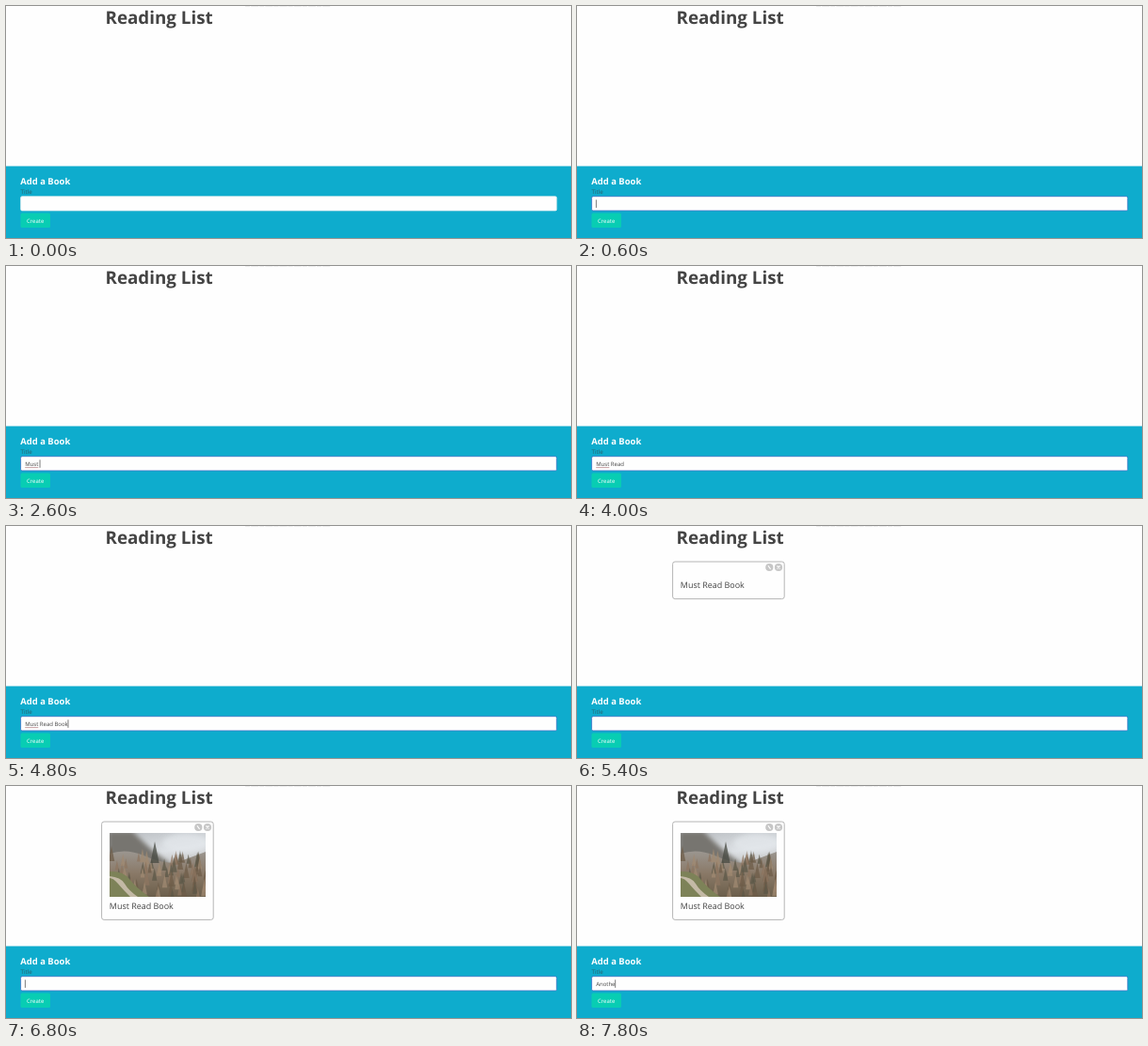
An HTML page that plays this animation: 600 by 247 pixels, repeating every 8 s.

```html
<!DOCTYPE html>
<html lang="en">
<head>
<meta charset="utf-8">
<title>Reading List</title>
<style>
html, body { margin: 0; width: 100%; height: 100%; overflow: hidden; background: #fefefe; }
svg { display: block; }
text {
  font: 6px "Open Sans", "Noto Sans", sans-serif;
  fill: #444;
  white-space: pre;
  text-rendering: geometricPrecision;
}
.bold { font-weight: 700; }
</style>
</head>
<body>
<svg width="600" height="247" viewBox="0 0 600 247">
  <defs>
    <linearGradient id="sky" x1="0" y1="0" x2=".25" y2="1">
      <stop offset="0" stop-color="#b9bdc1"/>
      <stop offset=".4" stop-color="#dde1e5"/>
      <stop offset="1" stop-color="#a5a19c"/>
    </linearGradient>
    <linearGradient id="hill" x1="0" y1="0" x2="0" y2="1">
      <stop offset="0" stop-color="#9b9690"/>
      <stop offset=".5" stop-color="#897866"/>
      <stop offset="1" stop-color="#6b5f4c"/>
    </linearGradient>
    <filter id="soft"><feGaussianBlur stdDeviation="2.5"/></filter>
    <clipPath id="frame"><path d="M110 50H212V118H110Z"/></clipPath>
  </defs>

  <path d="M254 0H345" stroke="#d4d4d4" stroke-width=".8" stroke-dasharray="5 1.2 8 1"/>
  <text class="bold" x="105.5" y="19.3" style="font-size:18.8px">Reading List</text>

  <g id="card">
    <rect id="box" x="101.6" y="38" width="118.6" rx="2.5" fill="#fefefe" stroke="#b5b5b5"/>
    <g fill="#c6c6c6"><circle cx="204.3" cy="44" r="4.1"/><circle cx="214" cy="44" r="4.1"/></g>
    <path d="M202.9 42.2L205.6 45.9M212.5 42.5L215.5 45.5M215.5 42.5L212.5 45.5" stroke="#fff" stroke-width="1.1"/>
    <g id="photo" clip-path="url(#frame)">
      <path d="M110 50H212V118H110Z" fill="url(#sky)"/>
      <path d="M108 48H134Q146 60 160 72L176 84L150 100H108Z" fill="#77756f" filter="url(#soft)"/>
      <path d="M110 72Q128 66 146 74T180 82L212 70V118H110Z" fill="url(#hill)"/>
      <g id="trees"></g>
      <path d="M110 91Q124 90 131 99T152 118H110Z" fill="#7d8258"/>
      <path d="M110 96Q122 97 126 104T140 118H132Q124 110 119 104T110 98Z" fill="#c3b9a5"/>
      <ellipse cx="190" cy="61" rx="24" ry="10" fill="#e3e7eb" opacity=".75" filter="url(#soft)"/>
    </g>
    <text id="name" x="109.8" style="font-size:8.96px">Must Read Book</text>
  </g>

  <path d="M0 170.6H600V247H0Z" fill="#0eaccd"/>
  <text class="bold" x="15.3" y="189.5" style="font-size:9.45px;fill:#fff">Add a Book</text>
  <text x="15.5" y="200.3" style="font-size:6.2px;fill:#28606c">Title</text>
  <rect id="input" x="15.6" y="202.7" width="569.2" height="15.2" rx="1.5" fill="#fefefe" stroke-width=".8"/>
  <text id="typed" x="20.2" y="213.2"></text>
  <path id="spell" d="M20.2 214.6H34.3" stroke="#b07a80" stroke-width=".7"/>
  <path id="caret" d="M0 206.3V214.8" stroke="#444" stroke-width=".7"/>
  <rect x="15.5" y="220.5" width="31.5" height="15.6" rx="1.5" fill="#08cdb3"/>
  <text x="22" y="230.8" style="fill:#fff">Create</text>
</svg>
<script>
const $ = id => document.getElementById(id);
const LOOP = 8000;

// [start ms, typed text, caret visible]
const steps = [
  [0, '', 0], [400, '', 1], [1200, '', 0], [1600, '', 1],
  [2000, 'M', 1], [2200, 'Mu', 1], [2400, 'Must', 1], [2600, 'Must ', 1],
  [2800, 'Must R', 1], [3000, 'Must Re', 1], [3400, 'Must Read ', 1],
  [4000, 'Must Read ', 0], [4200, 'Must Read B', 1], [4400, 'Must Read Bo', 1],
  [4600, 'Must Read Boo', 1], [4800, 'Must Read Book', 1],
  [5400, '', 0], [5800, '', 1], [6400, '', 0], [6600, '', 1],
  [7000, 'A', 1], [7200, 'An', 1], [7400, 'Ano', 1], [7600, 'Anot', 1], [7800, 'Anothe', 1]
];

function plantTrees() {
  let seed = 7;
  const rand = () => (seed = seed * 16807 % 2147483647) / 2147483647;
  const tones = ['#6d5c48', '#8d7660', '#5c5848', '#a08a72'];
  const tree = (x, y, h, tone) =>
    `<path d="M${x} ${y - h}L${x + h / 5} ${y}H${x - h / 5}Z" fill="${tone}" opacity=".75"/>`;
  let out = '';
  for (let i = 0; i < 90; i++) {
    const y = 80 + i * 0.45;
    out += tree(112 + rand() * 100, y, 8 + rand() * 9, tones[i % 4]);
  }
  $('trees').innerHTML = out + tree(158, 82, 23, '#474a42');
}

const show = (id, on) => $(id).style.display = on ? '' : 'none';

function draw(now) {
  const t = now % LOOP;
  const [, text, caret] = steps.findLast(s => s[0] <= t);
  const loaded = t >= 5600;

  $('typed').textContent = text;
  const width = text ? $('typed').getComputedTextLength() : 0;
  $('caret').setAttribute('transform', `translate(${20.4 + width})`);
  show('caret', caret);
  show('spell', t >= 2600 && t < 5400);
  $('input').setAttribute('stroke', t < 200 ? '#d5e9ee' : '#3970c4');

  show('card', t >= 5400);
  show('photo', loaded);
  $('box').setAttribute('height', loaded ? 104.4 : 39.6);
  $('name').setAttribute('y', loaded ? 131 : 66);
  requestAnimationFrame(draw);
}

plantTrees();
requestAnimationFrame(draw);
</script>
</body>
</html>
```
